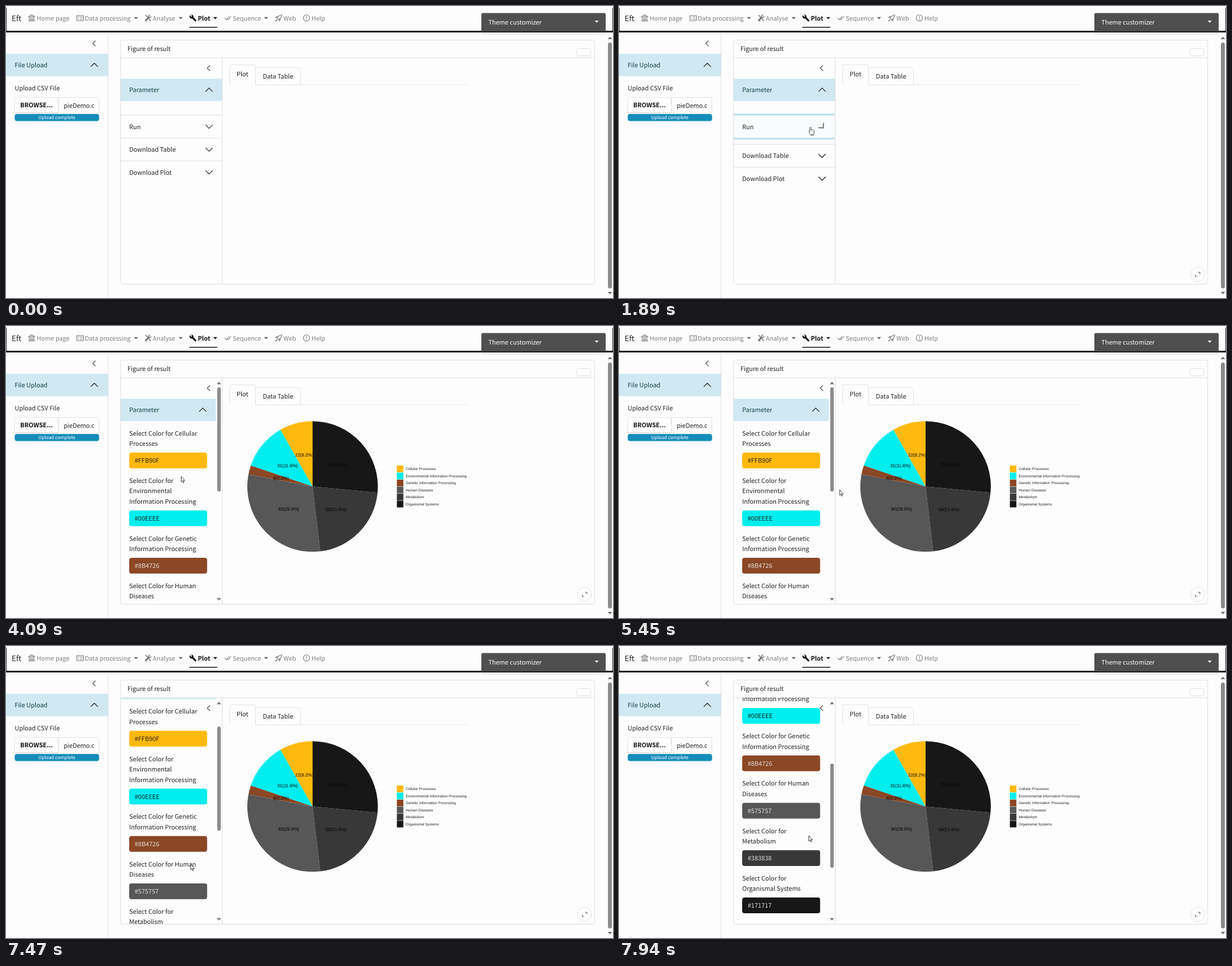
Write an HTML page that moves like this. It is 1079x519 px and loops after 8000 ms.

```html
<!DOCTYPE html>
<html lang="en">
<head>
<meta charset="utf-8">
<title>Pie plot</title>
<style>
html, body { margin: 0; width: 100%; height: 100%; overflow: hidden; background: #fdfdfd; }
svg { display: block; width: 1079px; height: 519px; }
text { font: 11px "Noto Sans CJK SC", "Noto Sans CJK JP", "Noto Sans", sans-serif; fill: #222; text-rendering: geometricPrecision; }
.b { font-weight: 700; fill: #111; }
.open { fill: #17404f; }
.nav text { fill: #7e7e7e; }
.nav .b { fill: #111; }
.nav .icon { fill: none; stroke: #777; stroke-width: 1.1; }
.head { fill: #cfe8f1; }
.line { fill: none; stroke: #dedede; }
.btn { fill: #fff; stroke: #e4e4e4; }
.edge { fill: none; stroke: #d2d2d2; stroke-width: 1.6; }
.chev { fill: none; stroke: #222; stroke-width: 1.3; }
.back { fill: none; stroke: #555; stroke-width: 1.2; }
.thumb { fill: #8b8b8b; }
.arrow { fill: #777; }
.plot text { font: 6.42px "Liberation Sans", Arial, sans-serif; fill: #222; }
.plot .label { font-size: 8px; fill: #000; text-anchor: middle; }

.anim { animation: 8s linear infinite; }
.folded { animation-name: folded; animation-timing-function: step-end; }
.params { animation-name: params; animation-timing-function: step-end; }
.plot { animation-name: plot; animation-timing-function: step-end; }
.drop { animation-name: drop; }
.turn { animation-name: turn; }
.fill { animation-name: fill; }
.ring { animation-name: ring; }
.press { animation-name: press; animation-timing-function: step-end; }
.expand { animation-name: expand; }
.scroll { --k: 1; animation-name: scroll; }
.thumb.scroll { --k: -.46; }
.cursor { animation-name: move; }
.hand { animation-name: hand; animation-timing-function: step-end; }
.point { animation-name: point; animation-timing-function: step-end; }

@keyframes folded { 0% { opacity: 1 } 45.25%, 100% { opacity: 0 } }
@keyframes params { 0% { opacity: 0 } 45.25%, 100% { opacity: 1 } }
@keyframes plot { 0% { opacity: 0 } 47.75%, 100% { opacity: 1 } }
@keyframes drop {
  0%, 22.95% { transform: translateY(0); animation-timing-function: ease }
  27.3%, 100% { transform: translateY(55px) }
}
@keyframes turn {
  0%, 22.8% { transform: rotate(0deg); animation-timing-function: ease-in-out }
  25.3%, 100% { transform: rotate(-180deg) }
}
@keyframes fill {
  0%, 23.25% { opacity: 0; animation-timing-function: ease-in-out }
  25.2%, 100% { opacity: 1 }
}
@keyframes ring {
  0%, 22.3% { opacity: 0 }
  23.3%, 33% { opacity: 1 }
  34.5%, 100% { opacity: 0 }
}
@keyframes press {
  0% { transform: none }
  33% { transform: translateY(1px) }
  34.2%, 100% { transform: none }
}
@keyframes expand { 0%, 6% { opacity: 0 } 8.5%, 100% { opacity: 1 } }
@keyframes scroll {
  0%, 89.3% { transform: translateY(0) }
  89.875% { transform: translateY(calc(-2px * var(--k))); animation-timing-function: cubic-bezier(.3, .2, .4, 1) }
  93% { transform: translateY(calc(-72.5px * var(--k))) }
  93.375% { transform: translateY(calc(-74px * var(--k))); animation-timing-function: cubic-bezier(.3, .2, .4, 1) }
  95.7% { transform: translateY(calc(-145px * var(--k))); animation-timing-function: ease-in-out }
  98.125%, 100% { transform: translateY(calc(-217.5px * var(--k))) }
}
@keyframes move {
  0%, 2.87% { transform: translate(520px, -16px); animation-timing-function: ease-out }
  12.375%, 13% { transform: translate(330px, 167px) }
  15.5%, 19% { transform: translate(335px, 211px) }
  20.625%, 27.3% { transform: translate(340.5px, 215.5px); animation-timing-function: ease-in-out }
  32.4%, 51.1% { transform: translate(310.5px, 267px) }
  53.2% { transform: translate(345px, 284px) }
  56.8% { transform: translate(505px, 150px) }
  58.5% { transform: translate(497px, 118px) }
  60.625%, 61.25% { transform: translate(436px, 110px) }
  68.125% { transform: translate(392px, 291px) }
  71.125%, 71.6% { transform: translate(341px, 277px) }
  73.8% { transform: translate(318px, 255px) }
  76.375%, 78.1% { transform: translate(339px, 237px) }
  82.5% { transform: translate(309px, 300px) }
  88.125% { transform: translate(333px, 393px) }
  89.875% { transform: translate(332px, 391px) }
  93.375% { transform: translate(328px, 388px) }
  98.125% { transform: translate(326px, 363px) }
  98.75% { transform: translate(331px, 350px) }
  99.25%, 100% { transform: translate(337px, 337px) }
}
@keyframes hand {
  0% { opacity: 0 } 8% { opacity: 1 } 13.2% { opacity: 0 } 14.6% { opacity: 1 }
  29.2% { opacity: 0 } 30.2% { opacity: 1 } 45.25% { opacity: 0 }
  57.3% { opacity: 1 } 62.2%, 100% { opacity: 0 }
}
@keyframes point {
  0% { opacity: 0 } 2.875% { opacity: 1 } 8% { opacity: 0 } 13.2% { opacity: 1 } 14.6% { opacity: 0 }
  29.2% { opacity: 1 } 30.2% { opacity: 0 } 45.25% { opacity: 1 }
  57.3% { opacity: 0 } 62.2%, 100% { opacity: 1 }
}
</style>
</head>
<body>
<svg viewBox="0 0 1079 519">
  <defs>
    <path id="down" class="chev" d="M-6.3-3.1 0 3.1 6.3-3.1"/>
    <path id="up" class="chev" d="M-6.3 3.1 0-3.1 6.3 3.1"/>
    <path id="back" class="back" d="M2.6-4.8-2.4 0 2.6 4.8"/>
    <path id="caret" d="M-3.6-1.8H3.6L0 1.9Z"/>
    <path id="tri" class="arrow" d="M-4 2H4L0-2.4Z"/>
    <clipPath id="panel"><rect x="204" y="92.5" width="180" height="401.5"/></clipPath>
    <clipPath id="file"><rect x="94" y="163" width="62.5" height="27"/></clipPath>
  </defs>
  <rect width="1079" height="519" fill="#fdfdfd"/>

  <g class="nav">
    <path d="M.5 3V45M1078.5 3V45" stroke="#333"/>
    <rect y="44" width="1079" height="3" fill="#1a1a1a"/>
    <text x="10" y="27" style="font-size:13.5px;fill:#222">Eft</text>
    <path class="icon" d="M40 19 45.5 15.5 51 19ZM41.5 20V25M44.2 20V25M46.9 20V25M49.5 20V25M39.5 26.7H51.8M40.5 25H50.7"/>
    <text x="54.5" y="25.5">Home page</text>
    <path class="icon" d="M126 17H137.5V26H126ZM128 19.7H129.5M131 19.7H135.5M128 23.2H129.5M131 23.2H135.5"/>
    <text x="140" y="25.5">Data processing</text>
    <use href="#caret" x="231" y="21.5" fill="#666"/>
    <path class="icon" style="stroke-width:1.6" d="M248 16 257.5 26.5M258 18.5A2.6 2.6 0 0 1 254.5 20L249 26.5 247.7 25.2 253.5 19.5A2.6 2.6 0 0 1 256 16"/>
    <text x="261" y="25.5">Analyse</text>
    <use href="#caret" x="310.5" y="21.5" fill="#666"/>
    <path d="M327 16.5 329.5 19.5 331 17.5 328.5 15.3A4 4 0 0 1 333.3 20L338 24.7A1.6 1.6 0 0 1 335.5 27L331 22.3A4 4 0 0 1 326.3 17Z" fill="#111"/>
    <text class="b" x="341" y="25.5">Plot</text>
    <use href="#caret" x="372" y="21.5" fill="#111"/>
    <rect x="326" y="37" width="49.5" height="1.5" fill="#111"/>
    <path class="icon" d="M389 21.5 391.8 24.5 397 18.5M393.5 23.3 394.8 24.5 400 18.5"/>
    <text x="403" y="25.5">Sequence</text>
    <use href="#caret" x="462.3" y="21.5" fill="#666"/>
    <path class="icon" d="M482 22.5C483.5 18 486.5 15.7 490.3 15.7 490.3 19.5 488 22.5 483.7 24.2ZM482.5 20.5H479.5L481.5 18.5H484M485.8 23.5V26.5L487.5 24.5V22M481 24 479 27 482 25M486.3 19.3H487.5"/>
    <text x="493" y="25.5">Web</text>
    <circle class="icon" cx="534" cy="21.3" r="5.5"/>
    <path class="icon" d="M534 18V22.3M534 23.6V25"/>
    <text x="543" y="25.5">Help</text>
  </g>

  <path d="M845 47H1066V48Q1066 52 1061 52H850Q845 52 845 48Z" fill="#f3f3f3"/>
  <path d="M845 45V15Q845 12.5 848 12.5H1063.5Q1066 12.5 1066 15V45Z" fill="#4f4f4f"/>
  <text x="857.5" y="32.5" style="fill:#fff">Theme customizer</text>
  <use href="#caret" x="1050" y="27.8" fill="#fff"/>

  <use href="#tri" x="1073.5" y="57"/>
  <rect class="thumb" x="1070" y="65" width="7" height="437" rx="3.5"/>
  <use href="#tri" transform="translate(1073.5 510) scale(1 -1)"/>

  <path class="line" d="M181.5 47V519"/>
  <use href="#back" x="156.5" y="66.5"/>
  <rect class="head" y="85" width="181" height="39.7"/>
  <text class="open" x="15.5" y="109">File Upload</text>
  <use href="#up" x="157" y="104.8"/>
  <text x="15.5" y="150">Upload CSV File</text>
  <rect class="btn" x="15.5" y="162.5" width="77.5" height="28" rx="3"/>
  <path class="edge" d="M17 190.2H92"/>
  <text class="b" x="25.3" y="180">BROWSE...</text>
  <path class="line" d="M93 162.5H162Q165 162.5 165 165.5V187.5Q165 190.5 162 190.5H93Z"/>
  <text x="102.5" y="181" clip-path="url(#file)">pieDemo.csv</text>
  <rect x="15.5" y="192" width="150" height="12.5" rx="4" fill="#158cba"/>
  <text x="90.5" y="201" text-anchor="middle" style="font-size:8.3px;fill:#fff">Upload complete</text>

  <rect class="line" x="203.5" y="60.5" width="843" height="434" rx="4"/>
  <path class="line" d="M204 92H1046M384.5 92V494"/>
  <text x="216" y="80">Figure of result</text>
  <rect class="line" x="1014.5" y="75.5" width="25" height="13.2" rx="3"/>
  <path class="line" d="M397.5 140V107.5Q397.5 104.5 400.5 104.5H440.5Q443.5 104.5 443.5 107.5V140.5M444 112.5Q444 109.5 447 109.5H520.5Q523.5 109.5 523.5 112.5V140.2M444 140.2H523.5" stroke-opacity=".85"/>
  <path class="line" d="M523 139.8H821" stroke-opacity=".7"/>
  <text x="410" y="125">Plot</text>
  <text x="456.5" y="129">Data Table</text>

  <g class="anim expand">
    <circle cx="1028.5" cy="477" r="12.3" fill="#fff" stroke="#e0e0e0"/>
    <path d="M1029.5 473.3H1032.7V476.3M1024.5 477.7V480.7H1027.5" fill="none" stroke="#555" stroke-width="1.1"/>
  </g>

  <g clip-path="url(#panel)">
    <g class="anim folded">
      <rect class="head" x="204" y="129.3" width="180" height="39.7"/>
      <text class="open" x="219" y="153">Parameter</text>
      <use href="#up" x="361" y="149"/>
      <g class="anim press">
        <rect class="btn" x="219" y="248" width="149.5" height="28" rx="3.5"/>
        <path class="edge" d="M221 275.8H367"/>
        <text class="b" x="294" y="266" text-anchor="middle">RUN</text>
      </g>
      <g class="anim drop">
        <rect x="204" y="235" width="180" height="260" fill="#fdfdfd"/>
        <path class="line" d="M204 234.8H384M204 275.3H384"/>
        <text x="219" y="259">Download Table</text>
        <use href="#down" x="361" y="255"/>
        <text x="219" y="300">Download Plot</text>
        <use href="#down" x="361" y="295.5"/>
      </g>
      <path class="line" d="M204 194H384"/>
      <rect class="head anim fill" x="204" y="194" width="180" height="40.3"/>
      <g class="anim ring" fill="#b9dfec">
        <rect x="204" y="191.3" width="180" height="3"/>
        <rect x="204" y="234.3" width="180" height="3"/>
      </g>
      <text x="219" y="218.5">Run</text>
      <g transform="translate(361 214.3)"><g class="anim turn"><use href="#down"/></g></g>
    </g>

    <g class="anim params">
      <g class="anim scroll" id="fields">
        <rect class="head" x="204" y="129.3" width="169" height="39.7"/>
        <text class="open" x="219" y="153">Parameter</text>
        <use href="#up" x="349.7" y="149"/>
      </g>
      <use href="#tri" x="378.5" y="101.5"/>
      <rect class="thumb anim scroll" x="375.5" y="109" width="6.3" height="185" rx="3.1"/>
      <use href="#tri" transform="translate(378.5 485.5) scale(1 -1)"/>
    </g>
    <use href="#back" x="360" y="110.5"/>
  </g>

  <g class="anim plot" id="plot"></g>

  <g class="anim cursor" stroke="#222" stroke-width=".9" stroke-linejoin="round" fill="#fff">
    <path class="anim point" d="M.4 0V9.8L2.5 7.9 4 11.4 5.4 10.8 3.9 7.4H6.8Z"/>
    <path class="anim hand" d="M-1.3 8V1.2A1.2 1.2 0 0 1 1.1 1.2V5L1.5 4.6C2.3 4.3 3 4.6 3.2 5.3 4 4.9 4.7 5.3 4.9 6 5.6 5.8 6.1 6.2 6.1 7V10C6.1 11.5 5.3 12 5.1 13.4H.2C-.2 12-2.6 10-3.4 8.2-3.8 7.2-2.6 6.6-2 7.3Z"/>
  </g>
</svg>
<script>
(() => {
  const add = (parent, tag, attrs, text) => {
    const node = document.createElementNS("http://www.w3.org/2000/svg", tag);
    for (const key in attrs) node.setAttribute(key, attrs[key]);
    if (text) node.textContent = text;
    return parent.appendChild(node);
  };

  const groups = [
    { name: "Cellular Processes", lines: ["Cellular", "Processes"], color: "#FFB90F", count: 22, ink: "#222" },
    { name: "Environmental Information Processing", lines: ["", "Environmental", "Information Processing"], color: "#00EEEE", count: 31, ink: "#222" },
    { name: "Genetic Information Processing", lines: ["Genetic", "Information Processing"], color: "#8B4726", count: 6, ink: "#e4dcd8" },
    { name: "Human Diseases", lines: ["Human", "Diseases"], color: "#575757", count: 80, ink: "#ddd" },
    { name: "Metabolism", lines: ["", "Metabolism"], color: "#383838", count: 58, ink: "#ddd" },
    { name: "Organismal Systems", lines: ["", "Organismal Systems"], color: "#171717", count: 71, ink: "#ddd" }
  ];

  // colour fields
  const fields = document.getElementById("fields");
  let lineY = 194.7;
  for (const g of groups) {
    g.lines.forEach((line, i) => {
      const text = i ? line : ("Select Color for " + line).trim();
      add(fields, "text", { x: 219, y: lineY + i * 18.5 }, text);
    });
    const boxY = lineY + g.lines.length * 18.5 - 6.6;
    add(fields, "rect", { x: 219, y: boxY, width: 138.5, height: 28, rx: 4, fill: g.color });
    add(fields, "text", { x: 228.7, y: boxY + 18, style: "fill:" + g.ink }, g.color);
    lineY = boxY + 53.8;
  }

  // pie, counter-clockwise from the top
  const plot = document.getElementById("plot");
  const total = groups.reduce((sum, g) => sum + g.count, 0);
  const cx = 545, cy = 285.3, radius = 116;
  const at = (turn, r) => [cx - r * Math.sin(turn * 2 * Math.PI), cy - r * Math.cos(turn * 2 * Math.PI)];
  const labels = [];
  let turn = 0;
  groups.forEach((g, i) => {
    const share = g.count / total;
    const d = `M${cx} ${cy}L${at(turn, radius)}A${radius} ${radius} 0 0 0 ${at(turn + share, radius)}Z`;
    add(plot, "path", { d, fill: g.color });
    const [x, y] = at(turn + share / 2, radius / 2);
    labels.push([x, y + 2.8, `${g.count}(${(share * 100).toFixed(1)}%)`]);
    turn += share;

    const row = 248 + i * 12.5;
    add(plot, "rect", { x: 694.8, y: row, width: 11.6, height: 11.9, fill: g.color });
    add(plot, "text", { x: 710.5, y: row + 8.4 }, g.name);
  });
  for (const [x, y, text] of labels) add(plot, "text", { class: "label", x, y }, text);
})();
</script>
</body>
</html>
```
